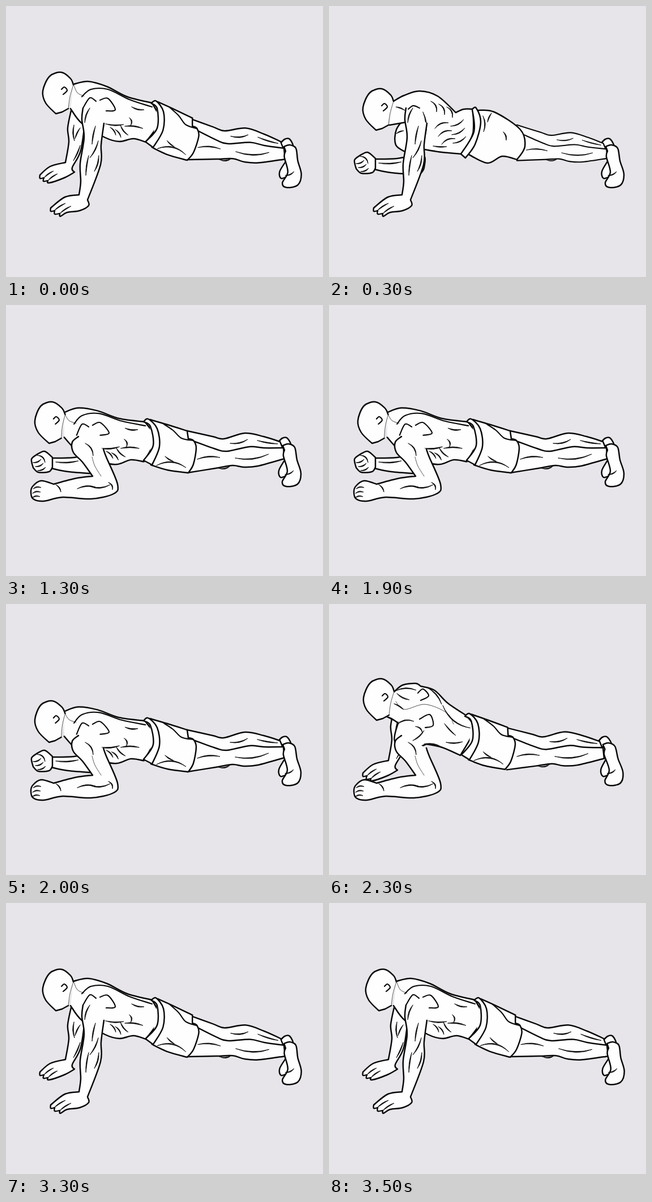
Animation of 560x478 px, one loop 3800 ms. Source, as an HTML page:

```html
<!DOCTYPE html>
<html lang="en">
<head>
<meta charset="utf-8">
<title>Plank to push-up</title>
<style>
html, body { margin: 0; width: 100%; height: 100%; overflow: hidden; background: #e7e5e9; }
svg { display: block; width: 100%; height: 100%; }
path { fill: none; stroke: #080808; stroke-linejoin: round; stroke-linecap: round; }
.body { fill: #fefefe; stroke-width: 2.5; }
.line { stroke-width: 2.1; }
.hair { stroke-width: .7; }
.mark { fill: #080808; stroke-width: .8; }
.pose { visibility: hidden; animation: 3800ms step-end infinite; }
#high { animation-name: high; }
#lower { animation-name: lower; }
#low { animation-name: low; }
#rise { animation-name: rise; }
@keyframes high { 0%, 86.84%, 100% { visibility: visible } 2.63% { visibility: hidden } }
@keyframes lower { 0%, 34.21%, 100% { visibility: hidden } 2.63% { visibility: visible } }
@keyframes low { 0%, 60.52%, 100% { visibility: hidden } 34.21% { visibility: visible } }
@keyframes rise { 0%, 86.84%, 100% { visibility: hidden } 60.52% { visibility: visible } }
</style>
</head>
<body>
<svg viewBox="0 0 560 478"><defs></defs></svg>
<script>
const svg = document.querySelector('svg'), defs = svg.querySelector('defs');
const path = (cls, d) => `<path class="${cls}" d="${d}"/>`;

// Catmull-Rom spline through key points
function spline(pts) {
  return pts.slice(1).map((c, i) => {
    const b = pts[i], a = pts[i - 1] || b, e = pts[i + 2] || c;
    const p = [0, 1].map(k => b[k] + (c[k] - a[k]) / 6);
    const q = [0, 1].map(k => c[k] - (e[k] - b[k]) / 6);
    return 'C' + [p, q, c].join(' ');
  }).join('');
}

// Key points as "x y x y"; "/" makes a corner, "z" closes
function trace(text, cls = 'body') {
  let last, d = '';
  for (const run of text.replace('z', '').split('/')) {
    const n = run.trim().split(' ').map(Number);
    const pts = n.flatMap((x, i) => i % 2 ? [] : [[x, n[i + 1]]]);
    d += last ? spline([last, ...pts]) : 'M' + pts[0] + spline(pts);
    last = pts.at(-1);
  }
  return path(cls, d + (text.endsWith('z') ? 'Z' : ''));
}
const line = text => trace(text, 'line');
const hair = text => trace(text, 'hair');

// Bowed muscle mark with thin ends, repeated n times at a fixed step
function mark(x1, y1, x2, y2, bow, n = 1, dx = 0, dy = 0) {
  const len = Math.hypot(x2 - x1, y2 - y1);
  const control = b => [(x1 + x2) / 2 - (y2 - y1) / len * b, (y1 + y2) / 2 + (x2 - x1) / len * b];
  const d = `M${x1} ${y1}Q${control(2 * bow + 1.6)} ${x2} ${y2}Q${control(2 * bow - 1.6)} ${x1} ${y1}Z`;
  return path('mark', d) + (n > 1 ? mark(x1 + dx, y1 + dy, x2 + dx, y2 + dy, bow, n - 1, dx, dy) : '');
}

const pivots = {};
function part(id, x, y, ...shapes) {
  pivots[id] = [x, y];
  defs.innerHTML += `<g id="${id}">${shapes.join('')}</g>`;
}

// Place a part, moved and sheared around its pivot
function put(id, dx = 0, dy = 0, { sx = 1, sy = 1, tilt = 0, lean = 0 } = {}) {
  const [x, y] = pivots[id];
  return `<use href="#${id}" transform="translate(${x + dx} ${y + dy}) matrix(${sx} ${tilt} ${lean} ${sy} 0 0) translate(${-x} ${-y})"/>`;
}
const pose = (id, ...layers) =>
  svg.insertAdjacentHTML('beforeend', `<g id="${id}" class="pose">${layers.join('')}</g>`);

part('head', 88, 190,
  trace('110 181 99 187 / 88 190 / 70 171 65 150 77 124 98 117 114 128 119 139'),
  line('98 147 103 143 108 149 101 156'),
  hair('119 139 113 160 110 181'));

part('heel', 495, 321,
  trace('480 243 488 235 497 235 503 249 484 252'),
  trace('492 274 482 292 485 304 498 300'));

part('foot', 495, 321,
  trace('489 248 / 499 245 510 251 514 273 521 297 515 316 495 320 488 312 497 293 490 266 492 256 z'),
  mark(493, 299, 508, 292, 2));

part('legs', 491, 261,
  trace('320 222 365 232 385 236 422 226 455 232 484 241 / 489 253 / 400 262 330 250'),
  trace('331 240 370 254 390 258 430 250 455 252 490 252 / 492 271 / 445 284 420 286 400 283 370 288 320 296'),
  mark(396, 244, 427, 237, 3),
  mark(444, 239, 480, 245, 1),
  mark(338, 272, 378, 269, -3),
  mark(405, 270, 464, 263, 5),
  mark(376, 288, 397, 283, 3));

part('shorts', 243, 240,
  trace('254 202 285 211 320 222 / 322 236 / 331 239 336 252 331 281 322 296 / 285 291 256 282'),
  line('277 209 295 221 310 235 331 239'),
  mark(266, 283, 318, 287, -8),
  mark(281, 267, 296, 276, 1),
  trace('243 206 / 251 201 267 218 271 250 258 282 / 243 274 / 260 248 255 214 243 206'));

part('back', 200, 190,
  trace('119 138 145 133 178 142 214 160 258 171 / 271 203 247 240 / 225 234 200 239 175 232 134 207 114 181'),
  line('134 160 150 147 180 147 218 165 258 178'),
  line('166 166 180 163 193 183 177 185'),
  line('159 168 148 162 136 180'),
  hair('120 140 126 153 138 159'),
  mark(176, 208, 208, 209, 2),
  mark(210, 212, 242, 216, -2),
  mark(202, 210, 216, 228, 2),
  mark(184, 214, 194, 228, -2, 2, 9, 4),
  mark(218, 197, 220, 211, -3),
  mark(222, 178, 244, 183, 2));

part('arm', 135, 180,
  trace('136 180 134 200 138 232 131 278 132 310 129 333 / 104 337 79 356 / 79 362 86 361 / 86 367 95 366 / 96 371 108 364 130 361 146 352 144 342 / 167 280 168 245 173 207'),
  mark(85, 361, 105, 348, -1, 2, 10, 5),
  mark(148, 180, 139, 206, 2),
  mark(158, 212, 152, 244, 1),
  mark(163, 238, 148, 268, -2),
  mark(146, 264, 141, 299, 1),
  mark(164, 264, 156, 292, -2));

part('farArm', 116, 180,
  trace('116 180 109 215 111 240 105 276 / 78 283 60 298 / 60 304 67 303 / 66 309 74 308 / 76 312 103 303 121 293 / 117 285 132 255 140 200'),
  mark(67, 303, 84, 291, -1, 2, 7, 5),
  mark(120, 210, 121, 238, 2),
  mark(131, 215, 122, 234, 1),
  mark(131, 246, 119, 273, -1));

part('elbow', 128, 232,
  trace('128 232 117 242 119 260 135 277 153 302 / 122 306 84 316 / 62 310 47 320 44 331 48 342 66 346 100 339 150 342 190 333 197 316 177 268 172 254'),
  mark(48, 324, 62, 322, -2, 3, -1, 8),
  mark(88, 317, 97, 330, -2),
  mark(126, 324, 158, 321, -3),
  mark(148, 320, 184, 317, 4),
  mark(181, 313, 188, 326, -3),
  mark(140, 244, 154, 266, -4),
  hair('152 268 157 284 168 302'));

part('fist', 80, 278,
  trace('80 270 120 269 165 262 168 285 160 298 / 110 294 80 288'),
  mark(88, 277, 128, 275, 2),
  trace('82 269 68 258 54 264 / 45 272 48 287 / 57 295 76 294 82 286 z'),
  mark(48, 278, 62, 272, 2, 3, 4, 7),
  mark(55, 265, 69, 278, -4));

pose('high',
  put('heel', 0, 0, { lean: -.05 }),
  put('legs', 1, -1, { tilt: .14 }),
  put('farArm'), put('back'), put('arm'),
  put('shorts', 8.5, -34.5, { sx: .976, tilt: .133, lean: -.15 }),
  put('head'),
  put('foot', 0, 0, { lean: -.03 }));

pose('lower',
  put('heel'),
  put('legs', 0, -1, { sx: .93, sy: .85, tilt: .1 }),
  put('fist'),
  trace('136 195 119 218 118 245 136 258'),
  mark(119, 225, 132, 220, -1),
  trace('114 168 132 158 160 150 192 159 224 188 / 238 182 254 182 / 254 225 235 261 / 200 258 168 253 / 136 205 / 107 210'),
  line('160 180 148 176 136 186'),
  mark(134, 184, 118, 178, 1),
  mark(166, 187, 171, 226, -3),
  mark(180, 168, 190, 187, -4, 3, 14, 5),
  mark(187, 216, 211, 206, -4, 3, 6, 14),
  mark(215, 212, 238, 200, 3, 3, 2, 15),
  mark(184, 247, 208, 248, 1),
  put('arm'),
  trace('262 184 292 187 338 218 346 248 332 271 / 306 265 280 277 247 262'),
  mark(272, 194, 273, 222, -3),
  mark(287, 189, 280, 205, 1),
  mark(308, 222, 313, 237, -2),
  trace('253 182 / 260 180 268 205 258 244 241 268 / 233 261 / 256 222 253 182'),
  put('head', -5, 29),
  put('foot'));

pose('low',
  put('heel'), put('legs'), put('fist'),
  put('back', -10, 42, { tilt: -.12, lean: .13 }),
  put('elbow'), put('shorts'),
  put('head', -12, 54, { lean: .05 }),
  put('foot'));

pose('rise',
  put('heel', 0, 0, { lean: .06 }),
  put('legs', -6, 1.5, { tilt: .03 }),
  put('farArm'),
  trace('115 155 130 143 153 140 162 145 / 186 152 210 175 243 197 / 256 222 232 267 / 200 253 172 247 / 140 262 / 116 242 122 210 / 112 203 100 198'),
  line('157 157 166 150 176 162 162 170'),
  line('160 203 178 195 184 214 170 218'),
  hair('118 172 133 186 170 177 208 192 220 212'),
  hair('100 198 120 208 134 205'),
  mark(118, 153, 154, 152, -4),
  mark(120, 158, 142, 169, 2),
  mark(173, 147, 199, 177, -4),
  mark(201, 179, 251, 219, 9),
  mark(115, 176, 132, 186, -1),
  mark(120, 213, 150, 207, -5),
  mark(153, 216, 165, 227, -3),
  mark(148, 241, 168, 223, 2),
  mark(168, 247, 200, 253, -3),
  mark(204, 211, 224, 232, 1),
  mark(207, 244, 236, 243, 2),
  put('elbow'),
  put('shorts', -6, -8, { tilt: .048, lean: -.09 }),
  put('head', -4, 15),
  put('foot', 0, 0, { lean: .07 }));
</script>
</body>
</html>
```
